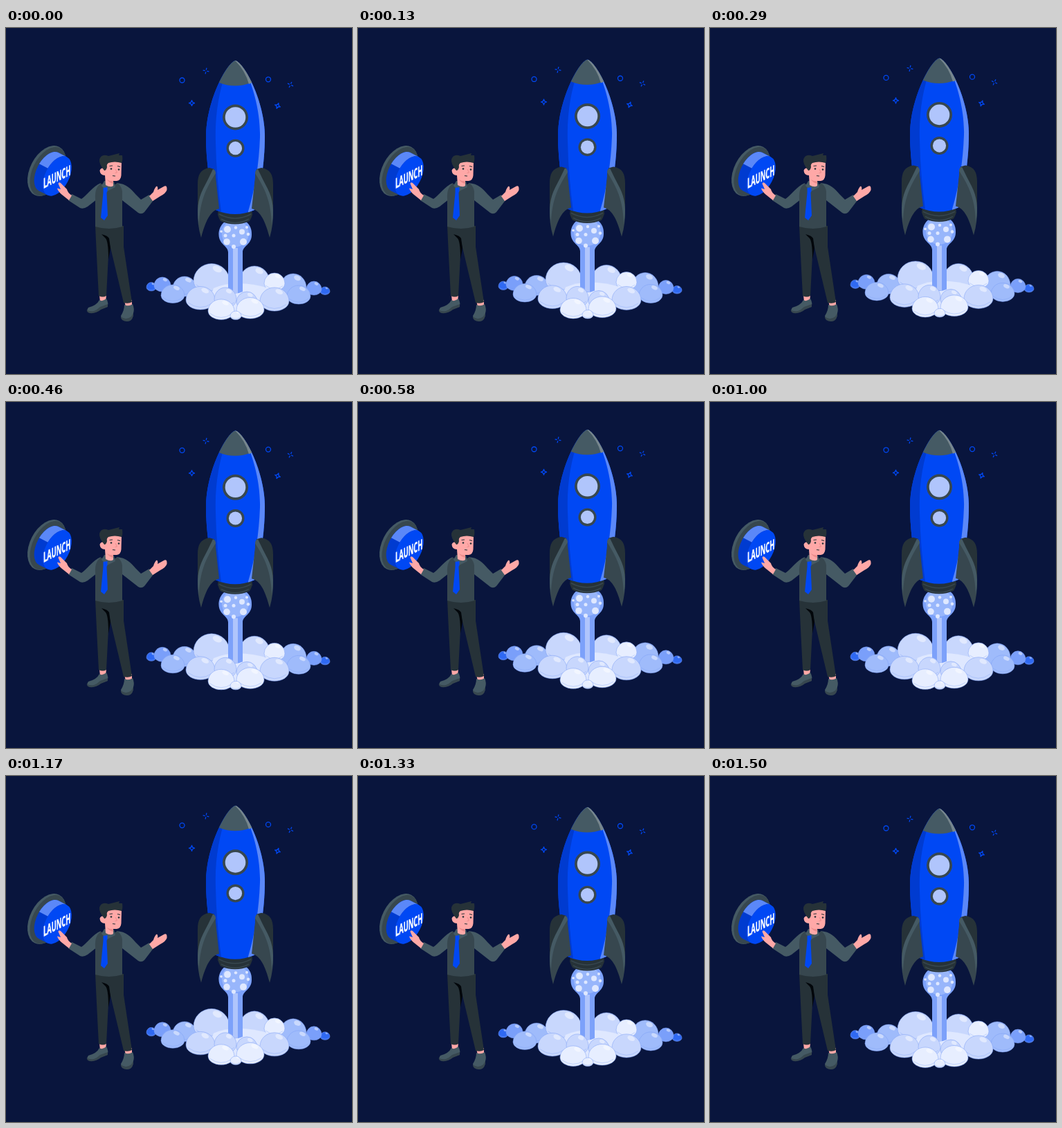
Animation, 500 px wide and 500 px high, one loop 1.54 s. Source, as an HTML page:

```html
<!DOCTYPE html>
<html lang="en">
<head>
<meta charset="utf-8">
<title>Rocket launch</title>
<style>
  html, body { margin: 0; height: 100%; overflow: hidden; background: #09153d; }
  svg { display: block; width: 100vw; height: 100vh; }
  .blue { fill: #0048f4; }
  .deep { fill: #003bd0; }
  .sky { fill: #5b88f8; }
  .ink { fill: #263238; }
  .slate { fill: #37474f; }
  .steel { fill: #455a64; }
  .skin { fill: #ffa8a7; }
  .pale { fill: #b0c5fc; }
  .line { fill: none; stroke: #0048f4; stroke-width: 1.3; }
  text { font: 700 20px "Open Sans", sans-serif; fill: #fff; stroke: #fff; stroke-width: .5; }
</style>
</head>
<body>
<svg viewBox="0 0 500 500">
  <defs>
    <path id="body" d="M331.500 47C318 51 289 107 289 157C289 196 296 236 303 263Q331 275 359 263C367 236 374 196 374 157C374 107 345 51 331.500 47Z"/>
    <clipPath id="hull"><use href="#body"/></clipPath>
    <g id="fin">
      <path class="ink" d="M294 202C281 204 277 212 277 226V262L290 242L304 228L301 204Z"/>
      <path class="slate" d="M300 204C303 207 303 211 303 216L308 261C295 264 288 280 282 303C274 276 276 252 286 232Q293 218 300 204Z"/>
      <path class="steel" d="M299 204Q303 205 303 210C289 232 280 250 279 284C275 264 277 248 285 232Q292 219 299 204Z"/>
    </g>
    <path id="star" d="M0-4.500Q.3-.3 4.500 0Q.3.3 0 4.500Q-.3.3-4.500 0Q-.3-.3 0-4.500Z"/>
    <path id="spark" d="M0-4.500V-1.300M0 4.500V1.300M-4.500 0H-1.300M4.500 0H1.300"/>
  </defs>

  <g id="button">
    <g transform="translate(59 206.500) rotate(27)">
      <ellipse class="steel" rx="24.300" ry="39"/>
      <ellipse class="slate" cx="2" rx="22.300" ry="38"/>
    </g>
    <g transform="translate(74 214) rotate(27)">
      <path class="deep" d="M0-31H-14A17.300 31 0 0 0-14 31H0Z"/>
      <path class="sky" d="M0-31H-14A17.300 31 0 0 0-31.200-4H-17.200A17.300 31 0 0 1 0-31Z"/>
      <ellipse class="blue" rx="17.300" ry="31"/>
    </g>
    <text transform="matrix(.465 -.235 0 1 54 232)">LAUNCH</text>
  </g>

  <g id="man">
    <path class="skin" d="M135 386H145L144 396H136ZM171 394L182 393V403H173Z"/>
    <path class="steel" d="M135 393Q139 396 145 391Q149 398 146 403L137 406Q130 412 121 411.500Q115 409 119 404Q131 401 135 393ZM171 400Q177 403 183 399Q186 406 184 412Q184 423 175 423.500Q166 423 166 416Q171 408 171 400Z"/>
    <path class="slate" d="M117 406Q118 410 127 409Q132 407 136 403L147 399V403L137 407Q130 413 121 412Q116 411 117 406ZM166 417Q173 423 181 417L184 412Q184 424 175 424Q166 424 166 417Z"/>
    <path class="ink" d="M129 286H170V316L182 396Q177 399 170 397L149 309L145 387Q140 390 134 387Q132 350 129 286Z"/>
    <path d="M138 298Q147 300 149 304L151 318L148 334Q148 306 143 303Z" fill="#02060a"/>
    <path class="steel" d="M137 224C126 228 116 243 109 247L95 240L90 249L107 260Q112 262 118 258L132 247ZM160 224C174 225 180 232 187 240L195 248L207 241L213 249L200 266Q196 270 191 267L168 249Z"/>
    <path class="slate" d="M137 225Q150 231 161 224Q167 229 168 236V287Q149 293 129 287V247Q128 230 137 225Z"/>
    <path class="steel" d="M142 221L138 228L146 236L158 230L156 222Z"/>
    <path class="skin" d="M143 213L144 227Q151 231 155 228V221H160Q166 220 166.500 213L167 194L154 190L145 192L142 203Q137 201 135.500 206Q136 213 143 213Z"/>
    <path d="M146 219Q151 222 155 221V225Q149 224 146 219Z" fill="#eb8e8d"/>
    <path class="ink" d="M142 206Q134 196 135 190Q138 181 148 185Q156 183 164 181L163 184L168 184Q169 192 167 195Q157 192 148 195Q145 197 146 201Q145 206 142 206Z"/>
    <g class="ink"><circle cx="152" cy="203.500" r="1.300"/><circle cx="163" cy="204.500" r="1.300"/></g>
    <path d="M149.500 199.500L154 199M161 199.500L165 200.500M154 213.500L158 214" fill="none" stroke="#263238" stroke-width="1.200"/>
    <path d="M158 204L160.500 209L157.500 209.500" fill="none" stroke="#eb8e8d"/>
    <path class="blue" d="M140.500 231L146.500 230V236L145.500 238L147 271L142 278L137 274L140.500 238Z"/>
    <path class="skin" d="M91 249L81 241Q75 236 74 231.500L79 233L75.500 225Q76 222 79 224L88 233Q89 238 95 242ZM207 243L213 237Q215 230 218 228.500Q220 230 219 234L229 228.500Q233 227 232.500 234Q231 239 223 243L212 250Z"/>
  </g>

  <g id="lift">
    <g class="line">
      <circle cx="254.500" cy="75.500" r="3.500"/>
      <circle cx="379" cy="74.300" r="3.500"/>
      <use href="#star" x="268.500" y="108.500"/>
      <use href="#star" transform="translate(392.500 112.500) rotate(20)"/>
      <use href="#spark" transform="translate(289 62) rotate(12)"/>
      <use href="#spark" transform="translate(411 82) rotate(25)"/>
    </g>
    <g id="back"></g>
    <path d="M300 376Q332 362 380 376L376 402L346 414H318L290 402Z" fill="#dfe8ff"/>
    <path d="M331 275C348 275 356 287 355 299C355 313 342 315 342 324V381Q331 386 321 381V324C321 315 308 313 307.500 299C307 287 316 275 331 275Z" fill="#7ca1fa"/>
    <circle cx="331.300" cy="297" r="19.500" fill="#98b6fb"/>
    <path class="pale" d="M328 318H335V383H328Z"/>
    <g id="bubbles" fill="#dfe8ff"></g>
    <g id="front"></g>

    <path class="ink" d="M307 262H355L356 270Q354 276 352 279Q331 288 310 279Q308 276 306 270Z"/>
    <path d="M308 269Q331 281 354 269M311 276Q331 287 351 276" fill="none" stroke="#37474f" stroke-width="1.500"/>
    <use href="#body" class="blue"/>
    <g clip-path="url(#hull)">
      <path class="deep" d="M280 60H319Q301 110 303 165Q304 220 313 280H280Z"/>
      <path class="sky" d="M338 47C357 78 368 122 367 158Q365 215 350 265V280H390V47Z"/>
      <path class="steel" d="M300 40H362V76L354 79Q331 88 308 79Z"/>
      <path d="M331 47Q346 62 351 81L360 77L345 47Z" fill="#77868d"/>
    </g>
    <circle class="slate" cx="331.500" cy="129" r="18.500"/>
    <circle class="pale" cx="331.500" cy="129" r="14.800"/>
    <circle class="slate" cx="331.500" cy="173.700" r="13"/>
    <circle class="pale" cx="331.500" cy="173.700" r="9.600"/>
    <use href="#fin"/>
    <use href="#fin" transform="matrix(-1 0 0 1 663 0)"/>
  </g>
</svg>
<script>
  const byId = id => document.getElementById(id);

  // Each puff: centre x, top, bottom, half width, colour
  function puff([x, top, bottom, r, color]) {
    const h = bottom - top, mid = top + h * .58;
    return `<path d="M${x - r} ${mid}A${r} ${h * .58} 0 0 1 ${x + r} ${mid}A${r} ${h * .42} 0 0 1 ${x - r} ${mid}Z"
        fill="${color}" stroke="#7d9ff5" stroke-width=".5"/>
      <path d="M${x - r * .85} ${mid + h * .12}Q${x} ${bottom + h * .08} ${x + r * .8} ${mid + h * .14}"
        fill="none" stroke="#7d9ff5" stroke-width=".6" opacity=".6"/>
      <ellipse rx="${r * .27}" ry="${h * .1}" fill="#fff" opacity=".45"
        transform="translate(${x + r * .32} ${top + h * .18}) rotate(25)"/>`;
  }

  const [royal, mid, soft, light, white] = ['#2f69f2', '#7a9ffa', '#9fbbfb', '#c8d7fd', '#e7eeff'];
  byId('back').innerHTML = [
    [210, 367.5, 380, 7, royal], [226, 360, 381, 12, mid],
    [258, 359, 388, 17, soft], [241, 371, 397.5, 17, soft],
    [461, 374, 385.5, 7, royal], [445, 366, 386, 11, mid],
    [415, 355, 390, 19, soft], [423, 372, 399, 17, soft],
    [297, 340.5, 384, 26, light], [359, 344, 384, 22, light],
    [388, 354, 380, 15, white]
  ].map(puff).join('');
  byId('front').innerHTML = [
    [281, 373.5, 407, 21, light], [317, 375, 405, 16, light],
    [348, 381, 407, 15, light], [388, 375, 409, 21, light],
    [311, 392, 421.5, 19, white], [353, 389.5, 420, 20, white],
    [332, 409, 421.5, 8, white]
  ].map(puff).join('');
  byId('bubbles').innerHTML = [
    [320, 291, 5], [332, 288.5, 2.2], [341, 294.5, 4], [348, 288, 2], [350, 298, 2.3],
    [311, 294, 1.8], [317, 300, 2.5], [329, 300, 2.5], [319, 309, 4.8], [329, 316, 3], [343, 309, 5]
  ].map(([x, y, r]) => `<circle cx="${x}" cy="${y}" r="${r}"/>`).join('');

  // Stepped 24 fps bob: straight up, straight down, one step of rest
  const LOOP = 1540, STEPS = 37, HALF = 18, RISE = 9.3;
  const lift = byId('lift');
  function draw(now) {
    const step = Math.floor(((now + 5) % LOOP) / LOOP * STEPS);
    const height = RISE * (1 - Math.abs(step - HALF) / HALF);
    lift.setAttribute('transform', `translate(0 ${-height})`);
    requestAnimationFrame(draw);
  }
  draw(0);
</script>
</body>
</html>
```
